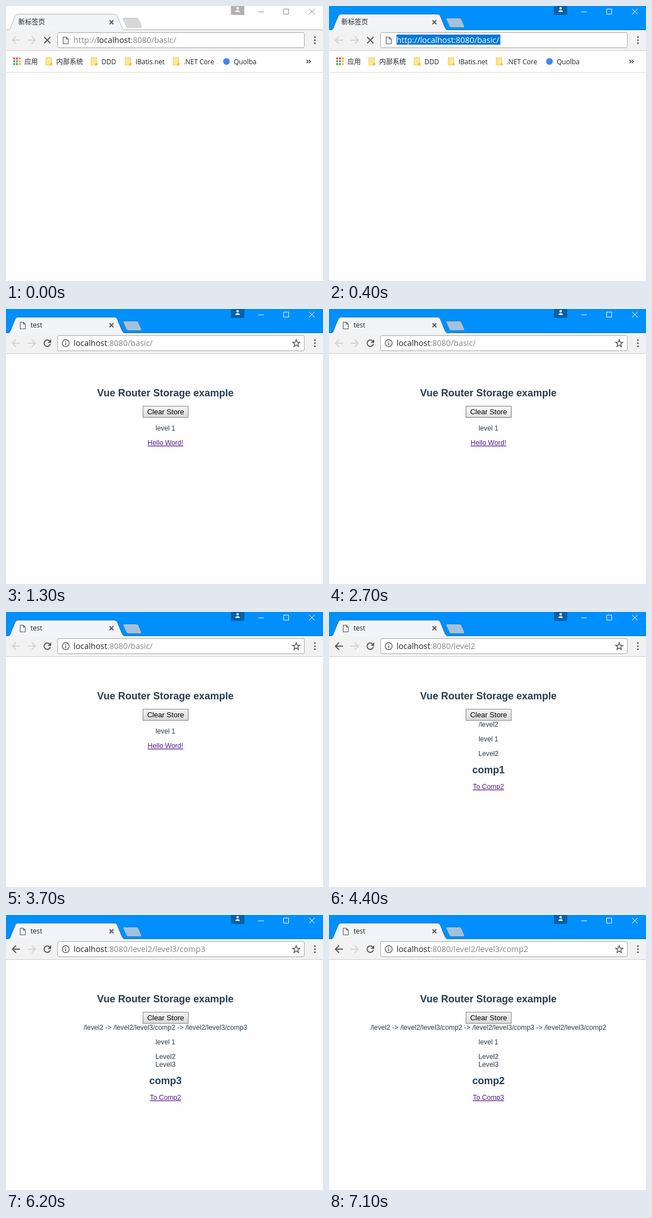
An HTML page for the animation above (8000 ms loop, 568x491 px).

```html
<!DOCTYPE html>
<html lang="zh">
<head>
<meta charset="utf-8">
<style>
  html, body { margin: 0; width: 100%; height: 100%; overflow: hidden; background: #fefefe; }
  svg { display: block; width: 568px; height: 491px; }
  text { white-space: pre; }
  .ui { font: 12px "Open Sans", "Noto Sans CJK SC", "Noto Sans CJK", sans-serif; fill: #222; }
  .url { font-size: 14.4px; fill: #858585; }
  .host { fill: #222; }
  .page { font: 12.25px "Liberation Sans", Arial, sans-serif; fill: #2c3e50; text-anchor: middle; }
  .head { font-size: 18px; font-weight: bold; }
  .link { fill: #551a8b; text-decoration: underline; }
  .button { font-size: 13.1px; fill: #000; }
  .line { fill: none; stroke-width: 2; }
</style>
</head>
<body>
<svg id="stage" viewBox="0 0 568 491"></svg>
<script>
const LOOP = 8000;
const stage = document.getElementById('stage');

const comp2 = '/level2/level3/comp2', comp3 = '/level2/level3/comp3';
const home = { rows: [['level 1', 217], ['Hello Word!', 243, 'link']] };
const level2 = {
  rows: [['/level2', 205], ['level 1', 231], ['Level2', 257], ['comp1', 288, 'head'], ['To Comp2', 316, 'link']]
};
const level3 = (trail, name, next) => ({
  rows: [[trail.join(' -> '), 205], ['level 1', 231], ['Level2', 257], ['Level3', 271],
         [name, 302, 'head'], ['To ' + next, 330, 'link']]
});

// Each step overrides the state left by the previous ones.
const steps = [
  [0, { active: false, loading: true, bookmarks: true, title: '新标签页', path: '/basic/' }],
  [400, { active: true, selected: true }],
  [1100, { selected: false, bookmarks: false, title: 'test' }],
  [1200, { page: home }],
  [1300, { loading: false }],
  [2700, { hover: true }],
  [3700, { hover: false }],
  [4300, { page: level2 }],
  [4400, { path: '/level2', back: true }],
  [5400, { path: comp2, page: level3(['/level2', comp2], 'comp2', 'Comp3') }],
  [6100, { page: level3(['/level2', comp2, comp3], 'comp3', 'Comp2') }],
  [6200, { path: comp3 }],
  [7000, { page: level3(['/level2', comp2, comp3, comp2], 'comp2', 'Comp3') }],
  [7100, { path: comp2 }]
];

const rect = (x, y, w, h, fill, extra = '') =>
  `<rect x="${x}" y="${y}" width="${w}" height="${h}" fill="${fill}" ${extra}/>`;
const line = (d, color, width = 2) =>
  `<path class="line" d="${d}" style="stroke:${color};stroke-width:${width}"/>`;
const text = (x, y, cls, content) => `<text x="${x}" y="${y}" class="${cls}">${content}</text>`;
const fileIcon = (x, y) =>
  `<path d="M${x} ${y}h5.5l3.5 3.5v8.5h-9zM${x + 5.5} ${y}v3.5h3.5" fill="#fff" stroke="#555" stroke-width="1.1"/>`;

function windowFrame({ active, title }) {
  const edge = active ? '#0870b8' : '#b4b4b4';
  const glyph = active ? '#fff' : '#8a8a8a';
  const tab = 'M5 42.5C8 41 9 36 11 31L16 19Q17.5 14.5 21 14.5H194Q198 14.5 199.500 18L206 34Q208.500 41 211 42.5';
  return rect(0, 0, 568, 43, active ? '#0090fd' : '#fff') +
    rect(0, 42, 568, 1, edge) +
    rect(0, 43, 568, 37, '#f2f2f2') +
    `<path d="${tab}V44H5Z" fill="#f2f4f8"/>` + line(tab, edge, 1) +
    `<path d="M211.500 21.500H234Q236.500 21.500 237.500 24L242.500 35.500Q243.500 38.500 241 38.500H218.500Q216.500 38.500 215.500 36L210 24Q209 21.500 211.500 21.500Z"
       fill="${active ? '#a3c1dc' : '#d7d7d7'}" stroke="${active ? '#2a7fc2' : '#cbcbcb'}"/>` +
    rect(403, 0, 24, 16, active ? '#0560a6' : '#b2b2b2') +
    '<path d="M411 10.500Q411 7.500 415 7.500T419 10.500Z" fill="#fff"/><circle cx="415" cy="4" r="2.200" fill="#fff"/>' +
    line('M452 10.500h10M497.500 5.500h9v9h-9zM543 5l10 10M553 5l-10 10', glyph, 1) +
    line('M185.500 25.500l7 7M192.500 25.500l-7 7', '#555', 1.8) +
    (title === 'test' ? fileIcon(25.5, 23.5) : '') +
    text(title === 'test' ? 44 : 22, 33, 'ui', title);
}

function toolbar({ loading, selected, back, path }) {
  const dark = '#5a5a5a', pale = '#d4d4d4';
  const host = `<tspan class="host">localhost</tspan>:8080${path}`;
  let out = rect(0, 79, 568, 1, '#d0d0d0') +
    line('M25 61H12M18 54.500L11.500 61l6.500 6.500', back ? dark : pale) +
    line('M39 61H52M46 54.500L52.500 61l-6.500 6.500', pale) +
    rect(92.5, 47.5, 442, 27, '#fff', 'rx="2.5" stroke="#a8a8a8"') +
    [55.5, 61, 66.5].map(y => `<circle cx="553.500" cy="${y}" r="1.600" fill="${dark}"/>`).join('');
  if (loading) {
    out += line('M68.500 55.500l11 11M79.500 55.500l-11 11', dark) + fileIcon(102.5, 55.5);
  } else {
    const star = Array.from({ length: 10 }, (_, i) => {
      const r = i % 2 ? 2.9 : 6.8, a = i * Math.PI / 5;
      return [520 + r * Math.sin(a), 61.5 - r * Math.cos(a)].map(v => v.toFixed(1));
    }).join(' ');
    out += line('M78.500 57.500A5.700 5.700 0 1 0 79.500 62.500', dark) +
      `<path d="M81 54v6.500h-6.500z" fill="${dark}"/>` +
      `<circle cx="107" cy="61" r="6.200" fill="none" stroke="${dark}" stroke-width="1.400"/>` +
      rect(106.2, 57.5, 1.6, 1.6, dark) + rect(106.2, 60.2, 1.6, 4.4, dark) +
      `<polygon points="${star}" fill="none" stroke="${dark}" stroke-width="1.500"/>`;
  }
  if (selected) {
    return out + rect(121, 51, 186, 18, '#0078d7') +
      `<text x="121" y="66" class="ui url" style="fill:#fff">http://localhost:8080${path}</text>`;
  }
  return out + text(121, 66, 'ui url', (loading ? 'http://' : '') + host);
}

function bookmarkBar() {
  const colors = ['#e8453c', '#e8453c', '#f0a030', '#3aa757', '#4285f4', '#f5b912', '#3aa757', '#3aa757', '#f5b912'];
  const apps = colors.map((c, i) => rect(13 + i % 3 * 5, 92 + Math.floor(i / 3) * 5, 3.4, 3.4, c)).join('');
  const folders = [[71, '内部系统'], [152, 'DDD'], [213, 'IBatis.net'], [299, '.NET Core']];
  return rect(0, 80, 568, 38, '#fff') + rect(0, 118, 568, 1, '#dadada') + apps +
    text(33, 104, 'ui', '应用') +
    folders.map(([x, name]) =>
      rect(x + .5, 92.5, 10, 13, '#ffe793', 'stroke="#edca55"') +
      rect(x + 8, 102, 4, 4, '#f0c23c') +
      text(x + 19, 104, 'ui', name)).join('') +
    '<circle cx="395" cy="99" r="6" fill="#4285f4"/>' + text(408, 104, 'ui', 'Quolba') +
    line('M538.500 96l3 3-3 3M542.500 96l3 3-3 3', '#444', 1.6);
}

function content({ page, hover }) {
  const [top, bottom] = hover ? ['#fafafa', '#e2e2e2'] : ['#f4f4f4', '#dadada'];
  return `<linearGradient id="face" x2="0" y2="1"><stop stop-color="${top}"/><stop offset="1" stop-color="${bottom}"/></linearGradient>` +
    text(285.5, 156, 'page head', 'Vue Router Storage example') +
    rect(245.5, 173.5, 81, 20, 'url(#face)', `stroke="${hover ? '#707070' : '#858585'}"`) +
    text(286, 188, 'page button', 'Clear Store') +
    page.rows.map(([label, y, cls = '']) => text(285.7, y, 'page ' + cls, label.replaceAll('>', '&gt;'))).join('');
}

let shown = -1;
function draw(now) {
  const time = now % LOOP;
  const count = steps.filter(([start]) => start <= time).length;
  if (count !== shown) {
    shown = count;
    const state = Object.assign({}, ...steps.slice(0, count).map(step => step[1]));
    stage.innerHTML = rect(0, 0, 568, 491, '#fefefe') + windowFrame(state) + toolbar(state) +
      (state.bookmarks ? bookmarkBar() : '') + (state.page ? content(state) : '');
  }
  requestAnimationFrame(() => draw(performance.now()));
}
draw(performance.now());
</script>
</body>
</html>
```
